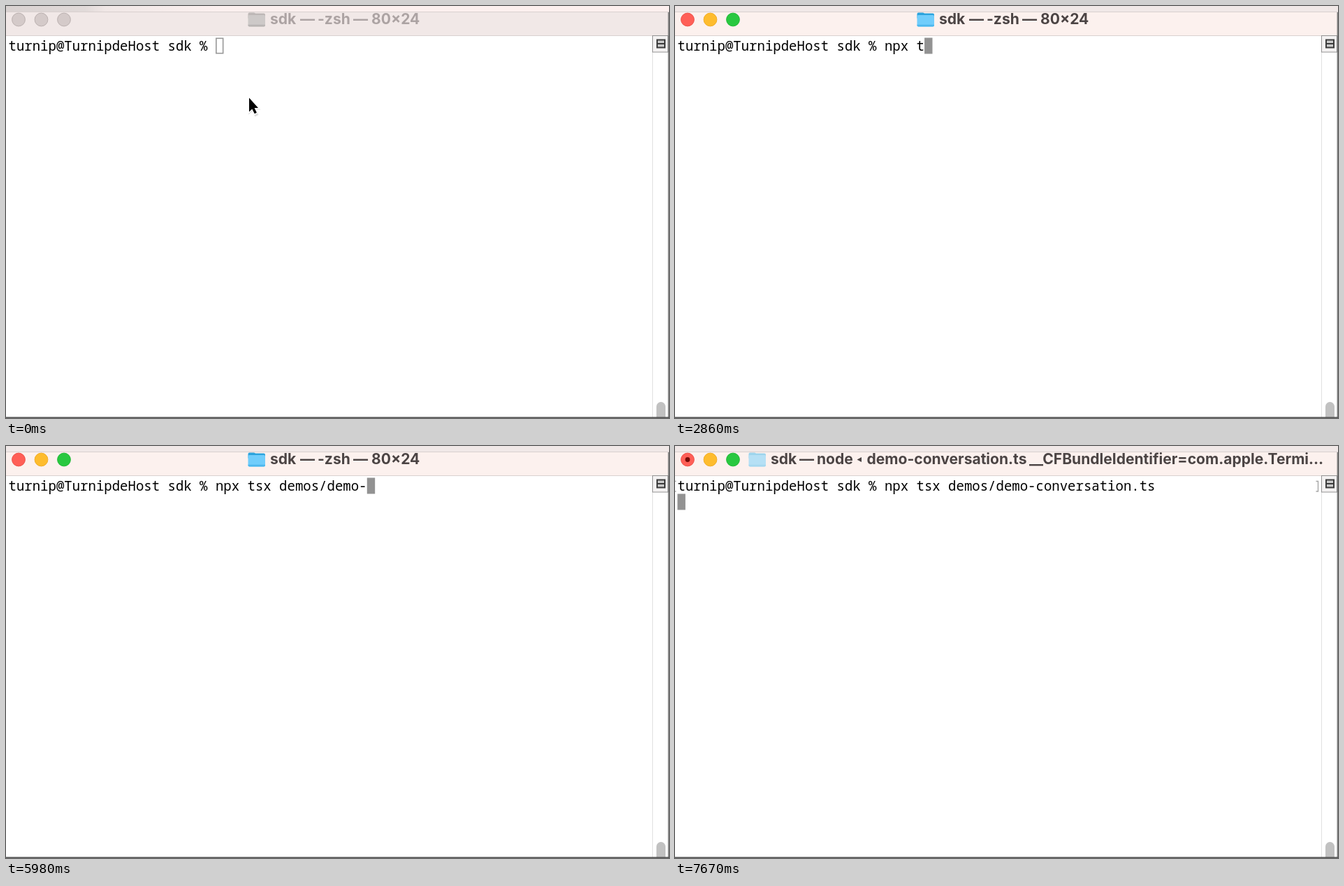
Recreate the animation shown at these times as an HTML page. Size 949 px wide and 590 px high, loop 8000 ms.

```html
<!DOCTYPE html>
<html lang="en">
<head>
<meta charset="utf-8">
<title>Terminal session</title>
<style>
  html, body { margin: 0; width: 100%; height: 100%; overflow: hidden; background: #fff; }
  svg { display: block; width: 949px; height: 590px; }
  text { white-space: pre; }
  .mono { font: 500 19.01px "Noto Sans Mono", "DejaVu Sans Mono", monospace; fill: #000; }
  .title { font: 700 21.05px Inter, Roboto, sans-serif; fill: #4b4444; }
  .inactive .title { fill: #aca3a3; }
  .bar { fill: #fcf1ee; }
  .inactive .bar { fill: #f1e8e7; }
  .strip { fill: #f0e8e7; }
  .inactive .strip { fill: url(#backdrop); }
  .red { fill: #ff5f57; stroke: #ee5048; }
  .yellow { fill: #febc2e; stroke: #efae2a; }
  .green { fill: #28c840; stroke: #22bb38; }
  .inactive .light { fill: #d4cac9; stroke: #bbb1b0; }
  .folder { --top: #2ba3dc; --body: #70cdfb; --base: #4db8ed; }
  .folder.pale { --top: #9dd4ec; --body: #b5e0f5; --base: #a6d8ef; }
  .inactive .folder { --top: #bdb7b6; --body: #cdc9c8; --base: #b9b5b4; }
  .cursor { fill: #929292; }
  .inactive .cursor { fill: #fff; stroke: #989898; stroke-width: 1.6; }
</style>
</head>
<body>
<svg id="stage" viewBox="0 0 949 590">
  <defs>
    <linearGradient id="backdrop">
      <stop offset="0" stop-color="#d9d2d1"/>
      <stop offset=".12" stop-color="#e1dad9"/>
      <stop offset=".15" stop-color="#f0e7e6"/>
      <stop offset=".32" stop-color="#fbf0ef"/>
      <stop offset="1" stop-color="#fdf0ef"/>
    </linearGradient>
  </defs>
  <rect width="949" height="590" fill="#fff"/>
  <rect class="strip" width="949" height="9"/>
  <rect class="bar" y="9" width="948" height="33"/>
  <path d="M0 8.5H949M0 42.5H949" stroke="#d9d0cf"/>

  <g stroke-width="1">
    <circle class="light red" cx="18" cy="19.5" r="9.4"/>
    <circle class="light yellow" cx="50.5" cy="19.5" r="9.4"/>
    <circle class="light green" cx="83" cy="19.5" r="9.4"/>
    <circle id="dot" cx="18" cy="19.5" r="3.4" fill="#760a06"/>
  </g>

  <g id="folder" class="folder">
    <path d="M0 2Q0 0 2 0H8Q9.500 0 10.500 1H22.500Q24.500 1 24.500 3V8H0Z" style="fill:var(--top)"/>
    <rect y="3.500" width="24.500" height="16.500" rx="1.800" style="fill:var(--body)"/>
    <path d="M0 17.200H24.500V18Q24.500 20 22.500 20H2Q0 20 0 18Z" style="fill:var(--base)"/>
  </g>
  <g id="titles"></g>

  <path d="M925.500 43V589" stroke="#e1e1e1"/>
  <rect x="925.500" y="42.500" width="22" height="23.500" fill="#f4f2f2" stroke="#929292"/>
  <path d="M932 48.500H943V59.500H932ZM932 54H943" fill="#c9c9c9" stroke="#3c3c3c" stroke-width="2"/>
  <path d="M931 589V573.500A6.500 6.500 0 0 1 944 573.500V589Z" fill="#c1c1c1"/>

  <rect id="cursor" class="cursor"/>
  <text class="mono" x="3.500" y="64" id="line"></text>
  <path id="brackets" d="M0 50.500H1.500M0 65H1.500M917.500 50.500H920.500V65H917.500" fill="none" stroke="#a6a6a6" stroke-width="1.400"/>

  <path d="M948.300 9V590" stroke="#7c7c7c" stroke-width="1.400"/>
  <path d="M0 589.200H949" stroke="#555" stroke-width="1.500"/>

  <g id="mouse">
    <path d="M0 1V25.500L5.500 21L9.500 28.500L14.500 26L11 18.500H17.500Z" fill="#000" opacity=".13"/>
    <path d="M1 1.500V21.500L5.300 17.500L8.800 24.300L11.900 22.700L8.600 16H14Z" fill="#000" stroke="#fff" stroke-width="2.600" paint-order="stroke"/>
  </g>
</svg>
<script>
const LOOP = 8000, STEP = 130, CELL = 11.406;
const PROMPT = "turnip@TurnipdeHost sdk % ";
const COMMAND = "npx tsx demos/demo-conversation.ts ";
const ACTIVE = 520, COMPLETE = 6630, ENTER = 7150, RETITLE = 7280, NODE = 7670;

// Time at which each typed character appears; the rest is completed at once.
const keys = [
  2080, 2210, 2340, 2600,
  2860, 2990, 3250, 3510,
  3770, 3900, 4030, 4160, 4420, 4810,
  5070, 5200, 5330, 5590, 5980, 6240
];

// Each title is a list of words with their left edges.
const titles = {
  shell: [[378, "sdk"], [421, "—"], [446, "-zsh"], [497, "—"], [523, "80×24"]],
  npm: [[137, "sdk"], [178, "—"], [203, "npm exec tsx demos/demo-conversation.ts __CFBundleIdentifier=c…"]],
  node: [[137, "sdk"], [178, "—"], [203, "node"], [274.5, "demo-conversation.ts"],
         [507, "__CFBundleIdentifier=com.apple.Termi…"]]
};

const $ = id => document.getElementById(id);
const set = (el, attrs) => Object.entries(attrs).forEach(([k, v]) => el.setAttribute(k, v));
const show = (el, on) => el.style.display = on ? "" : "none";

function add(parent, tag, attrs, text = "") {
  const el = document.createElementNS("http://www.w3.org/2000/svg", tag);
  set(el, attrs);
  el.textContent = text;
  parent.append(el);
  return el;
}

const groups = {};
for (const [name, words] of Object.entries(titles)) {
  groups[name] = add($("titles"), "g", {});
  for (const [x, word] of words) add(groups[name], "text", { class: "title", x, y: 26 }, word);
}
add(groups.node, "path", { d: "M267 16V23L260.500 19.500Z", fill: "#4b4444" });

function typed(t) {
  if (t >= COMPLETE) return COMMAND;
  return COMMAND.slice(0, keys.filter(k => t >= k).length);
}

function placeMouse(t) {
  const p = Math.min(1, Math.floor(t / STEP) * STEP / 780);
  const ease = p * p * (3 - 2 * p);
  set($("mouse"), { transform: `translate(${347 - 7 * ease} ${130 - 36 * ease})` });
  show($("mouse"), t < keys[0]);
}

function draw(t) {
  const active = t >= ACTIVE, entered = t >= ENTER;
  const name = t >= NODE ? "node" : t >= RETITLE ? "npm" : "shell";
  const line = PROMPT + typed(t);
  const column = entered ? 0 : line.length;
  const inset = active ? 0 : .8;

  set($("stage"), { class: active ? "" : "inactive" });
  for (const key in groups) show(groups[key], key === name);
  set($("folder"), {
    class: name === "shell" ? "folder" : "folder pale",
    transform: `translate(${name === "shell" ? 346.5 : 105.5} 9.5)`
  });
  $("line").textContent = line;
  set($("cursor"), {
    x: 3.5 + column * CELL + inset,
    y: (entered ? 68.5 : 45.5) + inset,
    width: CELL - 2 * inset,
    height: 23 - 2 * inset
  });
  show($("dot"), t >= RETITLE);
  show($("brackets"), t >= COMPLETE);
  placeMouse(t);
}

const start = performance.now();
function tick() {
  draw((performance.now() - start) % LOOP);
  requestAnimationFrame(tick);
}
tick();
</script>
</body>
</html>
```
